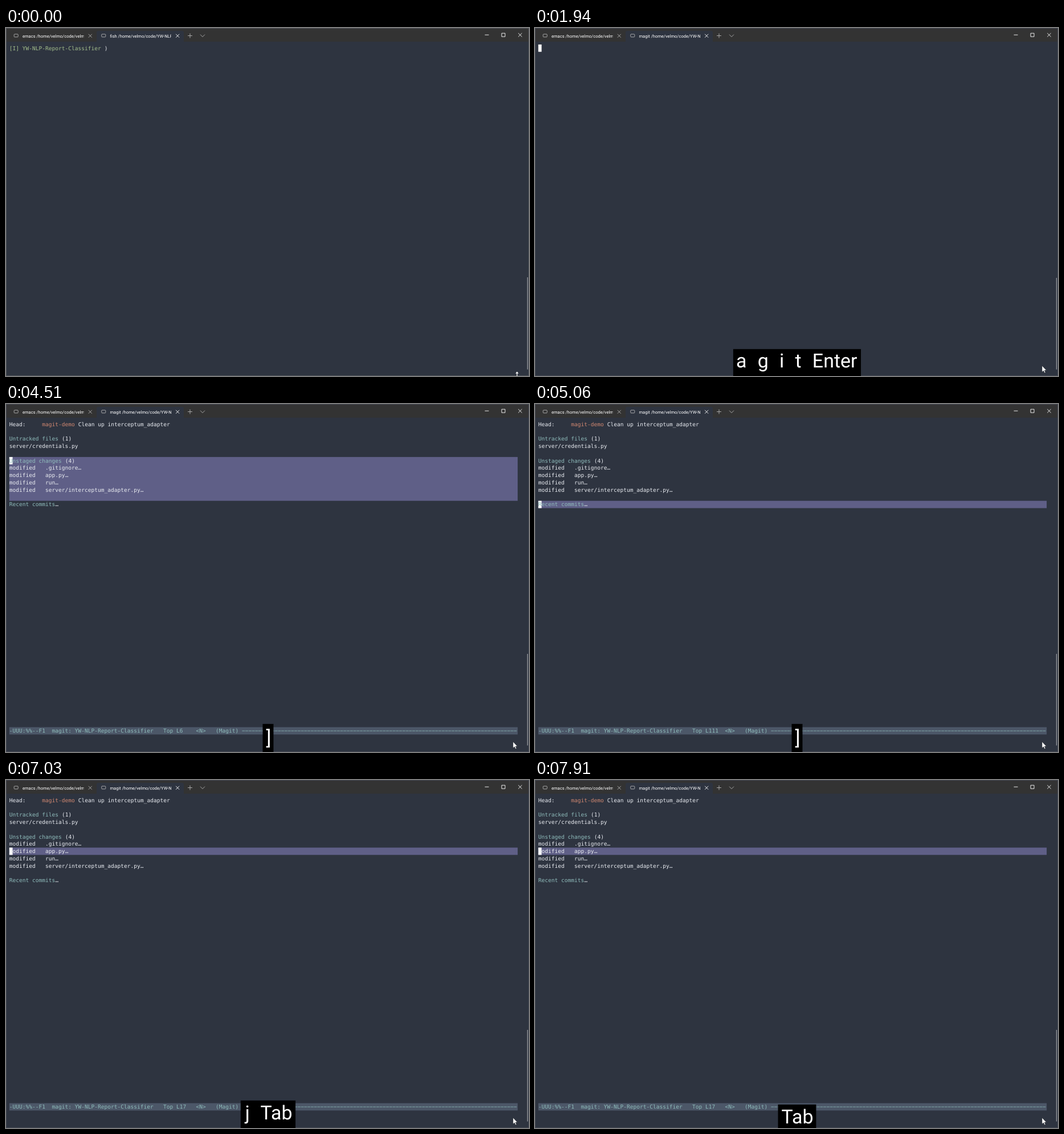
These frames come from a looping animation (918 by 610 pixels, 8000 ms). An HTML page:

```html
<!DOCTYPE html>
<html lang="en">
<head>
<meta charset="utf-8">
<title>Terminal session</title>
<style>
  html, body { margin: 0; width: 100%; height: 100%; overflow: hidden; background: #2e3440; }
  svg { display: block; }
  text { white-space: pre; text-rendering: geometricPrecision; }
  .mono { font: 9.563px "DejaVu Sans Mono", monospace; }
  .tab { font: 7.55px Roboto, sans-serif; fill: #fff; }
  .keys { font: 34px Roboto, sans-serif; word-spacing: 10.8px; fill: #fff; }
  .line { fill: none; stroke: #fff; stroke-width: .9; }
  .dim { stroke: #b4b4b4; }
</style>
</head>
<body>
<svg width="918" height="610" viewBox="0 0 918 610">
  <defs>
    <clipPath id="clipLeft"><rect x="28" y="4" width="108.5" height="20"/></clipPath>
    <clipPath id="clipRight"><rect x="181" y="4" width="109" height="20"/></clipPath>
  </defs>
  <rect width="918" height="610" fill="#2e3440"/>
  <rect width="918" height="24" fill="#333"/>
  <path d="M159 24V8q0-3 3-3H309q3 0 3 3V24Z" fill="#2e3440"/>
  <g class="line dim">
    <rect x="14.2" y="10.8" width="7" height="5" rx="1"/>
    <rect x="167.8" y="10.8" width="7" height="5" rx="1"/>
    <path d="M144.800 10.700l6 6m0-6l-6 6M319 13.500h8m-4-4v8M341 11.500l4 4 4-4"/>
  </g>
  <path class="line" d="M298.200 10.700l6 6m0-6l-6 6M840.500 12.100h7M870 9.200h6v6h-6zM899.200 9l6.400 6.400m0-6.400l-6.400 6.400"/>
  <g clip-path="url(#clipLeft)"><text class="tab" x="29" y="16.5">emacs /home/velmo/code/velmo</text></g>
  <g clip-path="url(#clipRight)"><text class="tab" id="title" x="182.5" y="16.5"></text></g>
  <rect id="scrollbar" x="914.8" width="1.28" fill="#9b9da1"/>
  <rect id="border" x=".5" y=".5" width="917" height="609" fill="none"/>
  <g id="screen"></g>
  <g id="overlay"></g>
  <path id="resize" d="M897 610v-6.500m-2 2.200l2-2.400 2 2.400" fill="none" stroke="#fff" stroke-width="1.2"/>
  <path id="arrow" d="M0 0V11L2.600 8.700 4.300 12.500 6 11.700 4.300 8.100H7.600Z" fill="#fff" stroke="#1d2027" stroke-width=".5"/>
</svg>
<script>
const LOOP = 8000, CELL_W = 5.757, CELL_H = 12.8, LEFT = 5.8, TOP = 28.9, COLS = 155;
const WHITE = '#e8ebf0', TEAL = '#8fbcbb', GREEN = '#a3be8c', RED = '#d0737b', ORANGE = '#d08770';
const HILITE = '#5f5f87', MODE_BG = '#4c5768', DIFF_BG = '#3b4252';
const PROJECT = 'YW-NLP-Report-Classifier';
const $ = id => document.getElementById(id);
const screen = $('screen'), overlay = $('overlay');

// Each entry changes part of the state at a moment in ms.
const timeline = [
  [0, { view: 'shell', program: 'fish', cmd: '', keys: '', cursor: false, focus: false, pointer: null }],
  [70, { pointer: [893, 600] }],
  [150, { pointer: [892, 597] }],
  [230, { pointer: [891, 594] }],
  [300, { pointer: [890, 592] }],
  [540, { focus: true }],
  [620, { cursor: true }],
  [1010, { keys: 'm' }],
  [1080, { cmd: 'm' }],
  [1150, { keys: 'm a', cmd: 'ma' }],
  [1330, { keys: 'm a g' }],
  [1390, { cmd: 'mag' }],
  [1460, { keys: 'm a g i' }],
  [1520, { cmd: 'magi' }],
  [1590, { keys: 'm a g i t' }],
  [1650, { cmd: 'magit' }],
  [1740, { keys: 'm a g i t Enter' }],
  [1830, { program: 'magit', view: 'blank' }],
  [1940, { keys: 'a g i t Enter' }],
  [2090, { keys: 'g i t Enter' }],
  [2260, { keys: 'i t Enter' }],
  [2350, { keys: 't Enter' }],
  [2420, { cursor: false }],
  [2490, { keys: 'Enter' }],
  [2640, { keys: '' }],
  [2960, { cursor: true }],
  [3500, { view: 'scratch', cursor: false, message: false }],
  [3570, { message: true }],
  [3730, { view: 'magit', row: 2, rows: 3, lineNo: 3, open: false }],
  [4050, { cursor: true }],
  [4510, { keys: ']', message: false, row: 5, rows: 6, lineNo: 6 }],
  [5060, { row: 11, rows: 1, lineNo: 111 }],
  [5740, { cursor: false }],
  [5990, { keys: '[', row: 5, rows: 6 }],
  [6070, { cursor: true, lineNo: 6 }],
  [6400, { keys: '[ j' }],
  [6460, { row: 6, rows: 1, lineNo: 7 }],
  [6770, { row: 7, lineNo: 17 }],
  [6950, { keys: 'j' }],
  [7030, { keys: 'j Tab' }],
  [7070, { open: true }],
  [7720, { keys: 'Tab', cursor: false }],
  [7910, { open: false, cursor: true }]
];

const status = [
  [0, 0, 'Head:'], [0, 10, 'magit-demo', ORANGE], [0, 21, 'Clean up interceptum_adapter'],
  [2, 0, 'Untracked files', TEAL], [2, 16, '(1)'],
  [3, 0, 'server/credentials.py'],
  [5, 0, 'Unstaged changes', TEAL], [5, 17, '(4)'],
  [6, 0, 'modified   .gitignore…'],
  [7, 0, 'modified   app.py'],
  [8, 0, 'modified   run…'],
  [9, 0, 'modified   server/interceptum_adapter.py…'],
  [11, 0, 'Recent commits', TEAL], [11, 14, '…']
];

const diff = [
  '@@ -1,6 +1,7 @@',
  ' import os',
  ' import json',
  '+import logging',
  ' ',
  ' from flask import Flask',
  ' from server import routes',
  ' ',
  '@@ -18,5 +19,5 @@',
  ' app = Flask(__name__)',
  ' ',
  '-app.run(debug=True)',
  '+app.run(debug=False)',
  ' ',
  ' '
];

function add(parent, tag, attrs, content) {
  const node = document.createElementNS('http://www.w3.org/2000/svg', tag);
  for (const name in attrs) node.setAttribute(name, attrs[name]);
  if (content) node.textContent = content;
  parent.append(node);
}

const colX = col => LEFT + col * CELL_W;
const rowY = row => TOP + row * CELL_H;

function print(row, col, str, fill = WHITE) {
  add(screen, 'text', { class: 'mono', x: colX(col), y: rowY(row) + 9.7, fill }, str);
}

function fillCells(row, rows, fill, col = 0, cols = COLS) {
  add(screen, 'rect', { x: colX(col), y: rowY(row), width: cols * CELL_W, height: rows * CELL_H, fill });
}

function drawCursor(s, row, col = 0) {
  if (s.cursor) fillCells(row, 1, '#fff', col, 1);
}

// The minus sign gives the long dashes of the rule.
function printModeLine(str, color) {
  print(42, 0, str.padEnd(COLS, '\u2212'), color);
}

function drawDiff(startRow) {
  diff.forEach((str, i) => {
    const mark = str[0];
    fillCells(startRow + i, 1, mark === '@' ? MODE_BG : DIFF_BG);
    print(startRow + i, 0, str, { '+': GREEN, '-': RED }[mark] || WHITE);
  });
}

const views = {
  shell(s) {
    print(0, 0, '[I] ' + PROJECT, GREEN);
    print(0, 29, ')');
    print(0, 31, s.cmd);
    drawCursor(s, 0, 31 + s.cmd.length);
  },
  blank(s) {
    drawCursor(s, 0);
  },
  scratch() {
    printModeLine('-UUU:----F1  *scratch*      All L1    <N>   (Fundamental) ');
  },
  magit(s) {
    const lineNo = String(s.lineNo).padEnd(5);
    fillCells(s.row, s.rows, HILITE);
    drawCursor(s, s.row);
    if (s.open) drawDiff(8);
    for (const [row, col, str, color] of status) {
      print(row + (s.open && row > 7 ? diff.length : 0), col, str, color);
    }
    if (!s.open) print(7, 17, '…');
    fillCells(42, 1, MODE_BG);
    printModeLine(`-UUU:%%--F1  magit: ${PROJECT}   Top L${lineNo}<N>   (Magit) `, TEAL);
  }
};

const ruler = document.createElement('canvas').getContext('2d');
ruler.font = '34px Roboto, sans-serif';
ruler.wordSpacing = '10.8px';

// The key box hugs the ink of its text and stands on the bottom edge.
function drawKeys(keys) {
  overlay.replaceChildren();
  if (!keys) return;
  const ink = ruler.measureText(keys);
  const width = ink.actualBoundingBoxLeft + ink.actualBoundingBoxRight + 12;
  const x = 460 - width / 2;
  const baseline = 602.3 - ink.actualBoundingBoxDescent;
  const y = baseline - ink.actualBoundingBoxAscent - 8.5;
  add(overlay, 'rect', { x, y, width, height: 610 - y, fill: '#000' });
  add(overlay, 'text', { class: 'keys', x: x + 6 + ink.actualBoundingBoxLeft, y: baseline }, keys);
}

function draw(s) {
  screen.replaceChildren();
  views[s.view](s);
  if (s.message) print(43, 0, 'For information about GNU Emacs and the GNU system, type C-h C-a.');
  drawKeys(s.keys);

  $('title').textContent = s.program + ' /home/velmo/code/' + PROJECT;
  $('border').setAttribute('stroke', s.focus ? '#454954' : '#53565c');
  const barTop = s.focus ? 438 : 437;
  $('scrollbar').setAttribute('y', barTop);
  $('scrollbar').setAttribute('height', 598.5 - barTop);
  $('resize').style.display = s.pointer ? 'none' : '';
  $('arrow').style.display = s.pointer ? '' : 'none';
  if (s.pointer) $('arrow').setAttribute('transform', `translate(${s.pointer})`);
}

const start = performance.now();
let shown = 0;

function tick() {
  const t = (performance.now() - start) % LOOP;
  const count = timeline.filter(([at]) => at <= t).length;
  if (count !== shown) {
    shown = count;
    draw(Object.assign({}, ...timeline.slice(0, count).map(([, change]) => change)));
  }
  requestAnimationFrame(tick);
}
tick();
</script>
</body>
</html>
```
